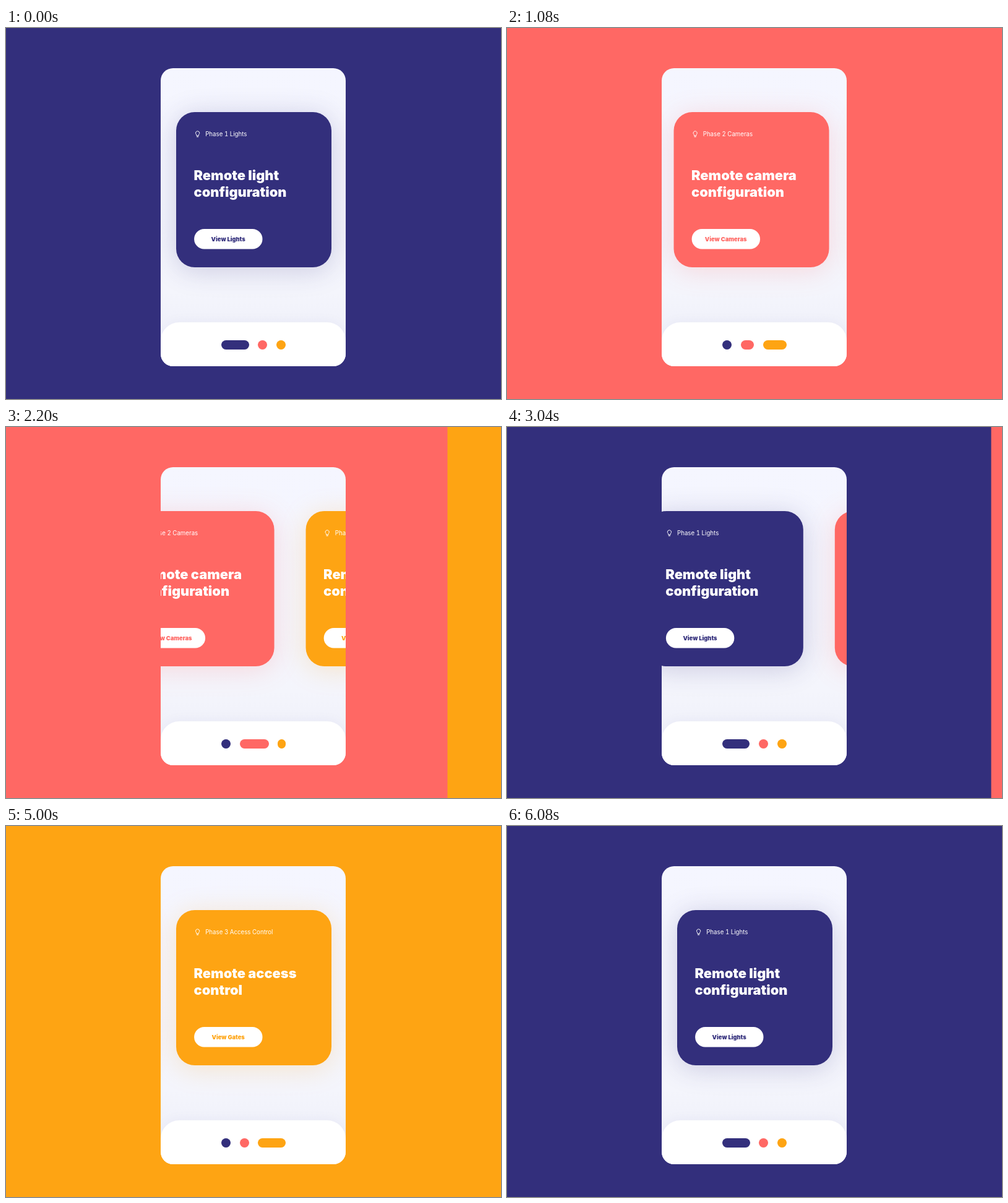
These frames come from a looping animation (800x600 px, 6.12 s). An HTML page:

```html
<!DOCTYPE html>
<html lang="en">
<head>
<meta charset="utf-8">
<title>Remote control carousel</title>
<style>
  html, body { margin: 0; width: 100%; height: 100%; overflow: hidden; }
  body { position: relative; background: #332f7c; font-family: Inter, sans-serif; }
  .panel { position: absolute; left: 0; top: 0; width: 800px; height: 600px; }
  .phone {
    position: absolute; left: 250px; top: 65px; width: 299px; height: 482px;
    border-radius: 20px; overflow: hidden;
    background: linear-gradient(#f5f6ff, #f4f5fc 75%, #f0f1fa 88%);
  }
  .card {
    position: absolute; left: 25.1px; top: 71.2px; width: 251px; height: 251px;
    border-radius: 30px;
  }
  .card svg { position: absolute; left: 0; top: 0; width: 100%; height: 100%; }
  .label { font-size: 9.7px; font-variant-numeric: tabular-nums; fill: #fff; }
  .title { font-size: 21.8px; font-weight: 900; fill: #fff; }
  .action { font-size: 9.35px; font-weight: 900; text-anchor: middle; }
  .bulb { fill: none; stroke: #fff; stroke-width: 1; stroke-linecap: round; stroke-linejoin: round; }
  .nav {
    position: absolute; left: 0; top: 411px; width: 299px; height: 71px;
    border-radius: 30px 30px 0 0; background: #fff;
    box-shadow: 0 -2px 20px rgba(51, 47, 124, .04);
  }
  .dot { position: absolute; top: 29.1px; height: 15.1px; border-radius: 7.6px; }
</style>
</head>
<body>
<script>
const LOOP = 6120, STEP = 302, CARD_MS = 620, PANEL_MS = 400;
const DOT = 15.1, STRETCH = 29.4, GAP = 14.4, DOTS_LEFT = 98.2;

const pages = [
  { color: '#332f7c', label: 'Phase 1 Lights', title: ['Remote light', 'configuration'], action: 'View Lights' },
  { color: '#ff6864', label: 'Phase 2 Cameras', title: ['Remote camera', 'configuration'], action: 'View Cameras' },
  { color: '#fea413', label: 'Phase 3 Access Control', title: ['Remote access', 'control'], action: 'View Gates' }
];

// Each move: pages left and entered, then start times of dots, cards and background.
const moves = [
  { from: 0, to: 1, dots: 80, cards: 191, panel: 206 },
  { from: 1, to: 2, dots: 950, cards: 1061, panel: 1082 },
  { from: 2, to: 1, dots: 1832, cards: 1948, panel: 1957 },
  { from: 1, to: 0, dots: 2592, cards: 2703, panel: 2717 },
  { from: 0, to: 2, dots: 3445, cards: 3549, panel: 3638 },
  { from: 2, to: 0, dots: 5040, cards: 5142, panel: 5230 }
];

function add(parent, className, color) {
  const el = document.createElement('div');
  el.className = className;
  if (color) el.style.background = color;
  parent.append(el);
  return el;
}

const panels = pages.slice(1).map(p => add(document.body, 'panel', p.color));
const phone = add(document.body, 'phone');

const cards = pages.map(p => {
  const el = add(phone, 'card', p.color);
  el.style.boxShadow = `0 5px 44px ${p.color}36`;
  el.innerHTML = `<svg viewBox="0 0 251 251">
    <path class="bulb" d="M33 38v-1.4a3.1 3.1 0 1 1 3.2 0v1.4zM33.5 40h2.2"/>
    <text class="label" x="47.2" y="39">${p.label}</text>
    <text class="title" x="28.5" y="110.4">${p.title[0]}</text>
    <text class="title" x="28.5" y="136.6">${p.title[1]}</text>
    <rect x="29.1" y="189" width="110.4" height="32.6" rx="16.3" fill="#fff"/>
    <text class="action" x="84.2" y="208.7" fill="${p.color}">${p.action}</text>
  </svg>`;
  return el;
});

const nav = add(phone, 'nav');
const dots = pages.map(p => add(nav, 'dot', p.color));

// The CSS "ease" curve, cubic-bezier(.25, .1, .25, 1).
function ease(x) {
  if (x <= 0) return 0;
  if (x >= 1) return 1;
  const bez = (a, b, s) => 3 * (1 - s) ** 2 * s * a + 3 * (1 - s) * s * s * b + s ** 3;
  let lo = 0, hi = 1;
  for (let i = 0; i < 24; i++) {
    const mid = (lo + hi) / 2;
    if (bez(.25, .25, mid) < x) lo = mid; else hi = mid;
  }
  return bez(.1, 1, lo);
}

// Wobbly spring: tension 180, friction 12.
function spring(ms) {
  if (ms <= 0) return 0;
  const t = ms / 1000;
  return 1 - Math.exp(-6 * t) * (Math.cos(12 * t) + .5 * Math.sin(12 * t));
}

function draw(time) {
  const active = [1, 0, 0], cover = [0, 0, 0];
  let scroll = 0;

  for (const m of moves) {
    const s = spring(time - m.dots);
    active[m.from] -= s;
    active[m.to] += s;
    scroll += (m.to - m.from) * STEP * ease((time - m.cards) / CARD_MS);
    const p = ease((time - m.panel) / PANEL_MS);
    // Going forward brings the new panel in; going back slides the old one out.
    if (m.to > m.from) cover[m.to] += p;
    else cover[m.from] -= p;
  }

  panels.forEach((el, i) => {
    el.style.transform = `translateX(${800 * (1 - cover[i + 1])}px)`;
  });
  cards.forEach((el, i) => {
    el.style.transform = `translateX(${i * STEP - scroll}px)`;
  });
  let x = DOTS_LEFT;
  dots.forEach((el, i) => {
    const width = DOT + STRETCH * active[i];
    el.style.left = x + 'px';
    el.style.width = width + 'px';
    x += width + GAP;
  });
}

const start = performance.now();
function tick() {
  draw((performance.now() - start) % LOOP);
  requestAnimationFrame(tick);
}
tick();
</script>
</body>
</html>
```
